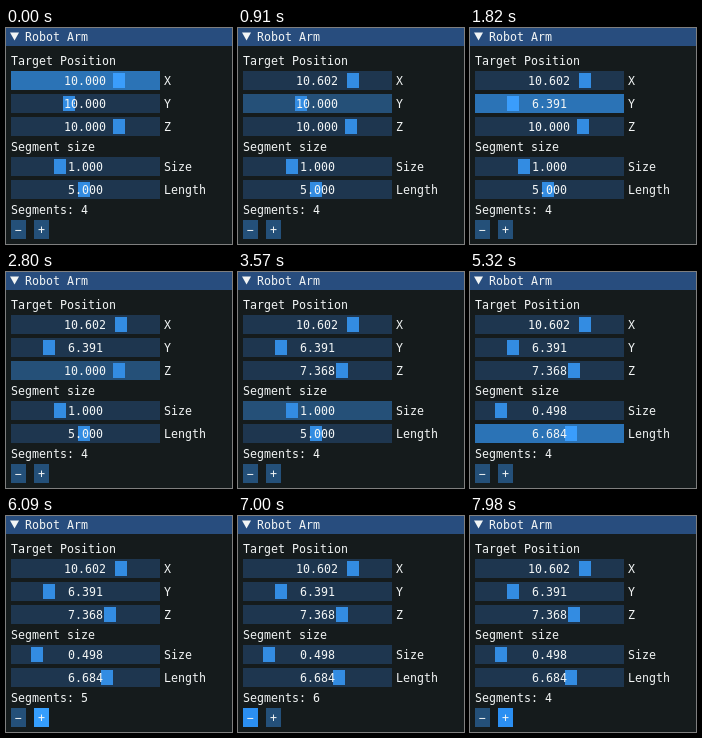
Animation, 226 px wide and 216 px high, one loop 8 s. Source, as an HTML page with a canvas:

```html
<!DOCTYPE html>
<html lang="en">
<head>
<meta charset="utf-8">
<title>Robot Arm</title>
<style>
html, body { margin: 0; width: 226px; height: 216px; overflow: hidden; background: #151b1c; }
canvas { display: block; }
</style>
</head>
<body>
<canvas id="stage" width="226" height="216"></canvas>
<script>
const ctx = document.getElementById('stage').getContext('2d');
const LOOP = 8000, STEP = 70, CHAR = 7;
const color = {
  window: '#151b1c', title: '#284d7e', text: '#f2f5f5',
  frame: ['#1e364f', '#255078', '#2b73b6'],
  grab: ['#338ce2', '#338ce2', '#3a9dfc'],
  button: ['#245079', '#359efd', '#2b8ff2']
};
const IDLE = 0, HOVER = 1, ACTIVE = 2;

// states: [time, state]; drag: [time, value]
const sliders = [
  { label: 'X', y: 43, min: -20, max: 20,
    states: [[0, ACTIVE], [700, HOVER], [910, IDLE]],
    drag: [[0, 10], [350, -6.842], [420, -6.842], [630, 10.602]] },
  { label: 'Y', y: 66, min: 1, max: 25,
    states: [[0, IDLE], [910, HOVER], [1400, ACTIVE], [1890, HOVER], [2170, IDLE]],
    drag: [[0, 10], [1470, 10], [1820, 6.391]] },
  { label: 'Z', y: 89, min: -20, max: 20,
    states: [[0, IDLE], [2800, HOVER], [3010, ACTIVE], [3430, HOVER], [3570, IDLE]],
    drag: [[0, 10], [3080, 10], [3360, 7.368]] },
  { label: 'Size', y: 129, min: 0.1, max: 3,
    states: [[0, IDLE], [3570, HOVER], [3640, IDLE], [3920, HOVER], [4130, ACTIVE], [4550, HOVER], [4760, IDLE]],
    drag: [[0, 1], [4130, 1], [4270, 1.676], [4480, 0.498]] },
  { label: 'Length', y: 152, min: 0.2, max: 10,
    states: [[0, IDLE], [3640, HOVER], [3920, IDLE], [4830, HOVER], [4970, ACTIVE], [5390, HOVER], [5530, IDLE]],
    drag: [[0, 5], [4970, 5], [5320, 6.684]] }
];
const buttons = [
  { label: '−', x: 5, states: [[0, IDLE], [6720, HOVER], [6790, ACTIVE], [6930, HOVER], [7000, ACTIVE],
    [7140, HOVER], [7210, ACTIVE], [7280, HOVER], [7350, ACTIVE], [7630, HOVER], [7700, IDLE]] },
  { label: '+', x: 28, states: [[0, IDLE], [5880, HOVER], [5950, ACTIVE], [6090, HOVER], [6230, ACTIVE],
    [6300, HOVER], [6370, ACTIVE], [6440, HOVER], [6650, IDLE], [7700, HOVER], [7770, ACTIVE],
    [7840, HOVER], [7980, ACTIVE]] }
];

const stateAt = (states, t) => states.filter(s => s[0] <= t).pop()[1];

// A click counts when the pressed button is released.
const clicks = (button, t) => button.states.filter(([at, state], i, all) =>
  at <= t && state === HOVER && i && all[i - 1][1] === ACTIVE).length;

function valueAt({ drag, min, max }, t) {
  const next = drag.findIndex(k => k[0] > t);
  if (next < 0) return drag[drag.length - 1][1];
  const [t0, v0] = drag[next - 1], [t1, v1] = drag[next];
  const pixel = (max - min) / 133;
  return v0 + Math.round((v1 - v0) * (t - t0) / (t1 - t0) / pixel) * pixel;
}

function rect(x, y, w, h, fill) {
  ctx.fillStyle = fill;
  ctx.fillRect(x, y, w, h);
}

function text(string, x, top) {
  ctx.fillStyle = color.text;
  [...string].forEach((c, i) => ctx.fillText(c, x + i * CHAR, top + 11));
}

function drawSlider(slider, t) {
  const { label, y, min, max } = slider;
  const state = stateAt(slider.states, t), value = valueAt(slider, t);
  rect(5, y, 149, 19, color.frame[state]);
  rect(Math.round(7 + (value - min) / (max - min) * 133), y + 2, 12, 15, color.grab[state]);
  const shown = value.toFixed(3);
  text(shown, Math.floor(5 + (149 - shown.length * CHAR) / 2), y + 3);
  text(label, 158, y + 3);
}

function drawTitle() {
  rect(0, 0, 226, 18, color.title);
  ctx.fillStyle = color.text;
  ctx.beginPath();
  ctx.moveTo(4, 4.6);
  ctx.lineTo(13, 4.6);
  ctx.lineTo(8.5, 12.4);
  ctx.fill();
  text('Robot Arm', 19, 2);
}

function draw(t) {
  rect(0, 0, 226, 216, color.window);
  ctx.font = '11.627px "DejaVu Sans Mono", monospace';
  drawTitle();
  text('Target Position', 5, 26);
  text('Segment size', 5, 112);
  sliders.forEach(s => drawSlider(s, t));
  const [minus, plus] = buttons;
  text('Segments: ' + (4 + clicks(plus, t) - clicks(minus, t)), 5, 175);
  for (const b of buttons) {
    rect(b.x, 192, 15, 19, color.button[stateAt(b.states, t)]);
    text(b.label, b.x + 4, 195);
  }
}

function tick() {
  const t = performance.now() % LOOP;
  draw(Math.floor(t / STEP) * STEP);
  requestAnimationFrame(tick);
}
tick();
</script>
</body>
</html>
```
